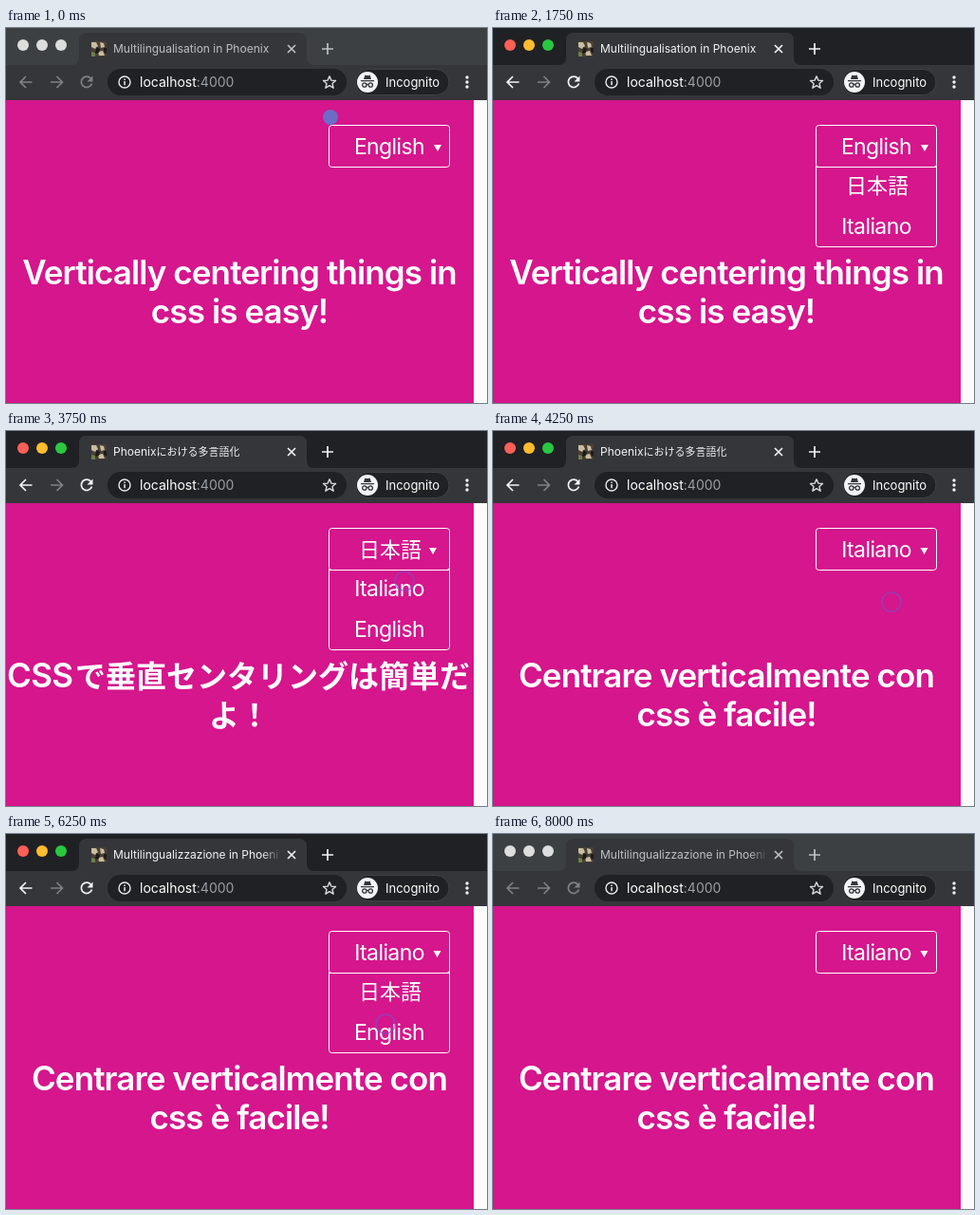
An HTML page that plays this animation: 507 px wide and 395 px high, repeating every 8500 ms.

```html
<!DOCTYPE html>
<html lang="en">
<head>
<meta charset="utf-8">
<title>Language switcher</title>
<style>
html, body { margin: 0; width: 100%; height: 100%; overflow: hidden; background: #d5168c; }
svg { display: block; width: 507px; height: 395px; font-family: Inter, "Noto Sans CJK JP", "Noto Sans CJK", sans-serif; }

/* Everything moves in hard steps on one 8.5 s clock */
svg, .en, .ja, .it, .tab-en, .tab-ja, .tab-it, .menu, .cursor, .ring, .dot {
  animation: 8.5s step-end infinite;
}
svg { animation-name: focus; }
.en { animation-name: en; }
.ja { animation-name: ja; }
.it { animation-name: it; }
.tab-en { animation-name: tab-en; }
.tab-ja { animation-name: tab-ja; }
.tab-it { animation-name: tab-it; }
.menu { animation-name: menu; }
.cursor { animation-name: move; }
.ring { animation-name: ring; }
.dot { animation-name: dot; }

.strip { fill: var(--strip); }
.tab-title { fill: var(--title); font-size: 12px; }
.kana { font-size: 11px; }
.red { fill: var(--red); }
.yellow { fill: var(--yellow); }
.green { fill: var(--green); }
.line { fill: none; stroke-width: 1.7; }
.mark { stroke: var(--title); }
.nav { stroke: var(--nav); }
.nav-fill { fill: var(--nav); }

.head { fill: #fff; font-weight: 600; font-size: 35px; letter-spacing: -.9px; text-anchor: middle; }
.head-ja { fill: #fff; font-weight: 700; font-size: 32px; }
.head-ja .latin { font-weight: 600; font-size: 35px; letter-spacing: -.6px; }
.item { fill: #fff; font-size: 23px; letter-spacing: -.6px; text-anchor: middle; }
.item-ja { fill: #fff; font-size: 22px; text-anchor: middle; }
.box { fill: none; stroke: #fff; }

@keyframes focus {
  0%, 94.11% { --strip: #3c4043; --title: #bdc1c6; --nav: #7f8285; --red: #dcdddd; --yellow: #dcdddd; --green: #dcdddd; }
  2.94% { --strip: #202124; --title: #f1f3f4; --nav: #f1f3f4; --red: #ff5f57; --yellow: #febc2e; --green: #28c840; }
  88.23% { --strip: #2e3134; --title: #d7dadd; --nav: #b8babd; --red: #ee9e9a; --yellow: #edcd86; --green: #82d38f; }
}
@keyframes en { 0% { opacity: 1 } 26.47%, 100% { opacity: 0 } }
@keyframes ja { 0%, 49.99% { opacity: 0 } 26.47% { opacity: 1 } }
@keyframes it { 0% { opacity: 0 } 49.99%, 100% { opacity: 1 } }
@keyframes tab-en { 0% { opacity: 1 } 29.41%, 100% { opacity: 0 } }
@keyframes tab-ja { 0%, 52.93% { opacity: 0 } 29.41% { opacity: 1 } }
@keyframes tab-it { 0% { opacity: 0 } 52.93%, 100% { opacity: 1 } }
@keyframes menu {
  0%, 26.47%, 49.99%, 64.7%, 85.29% { opacity: 0 }
  17.64%, 41.17%, 55.88%, 70.58% { opacity: 1 }
}
@keyframes ring {
  0%, 20.58%, 47.05%, 85.29% { opacity: 0 }
  2.94%, 26.47%, 49.99% { opacity: .6 }
}
@keyframes dot {
  0%, 23.52%, 47.05%, 85.29% { opacity: 1 }
  2.94%, 26.47%, 49.99%, 88.23% { opacity: 0 }
}
@keyframes move {
  0% { transform: translate(342px, 94px) }
  2.94% { transform: translate(354px, 110px) }
  5.88% { transform: translate(382px, 136px) }
  8.82% { transform: translate(408px, 167px) }
  11.76% { transform: translate(414px, 150px) }
  14.7% { transform: translate(414px, 130px) }
  23.52% { transform: translate(414px, 168px) }
  26.47% { transform: translate(416px, 182px) }
  29.41% { transform: translate(418px, 197px) }
  32.35% { transform: translate(421px, 165px) }
  35.29% { transform: translate(421px, 141px) }
  44.11% { transform: translate(420px, 158px) }
  47.05% { transform: translate(420px, 169px) }
  49.99% { transform: translate(420px, 180px) }
  52.93% { transform: translate(420px, 150px) }
  55.88% { transform: translate(418px, 136px) }
  58.82% { transform: translate(414px, 158px) }
  61.76% { transform: translate(411px, 147px) }
  64.7% { transform: translate(412px, 153px) }
  67.64% { transform: translate(413px, 142px) }
  70.58% { transform: translate(412px, 140px) }
  73.52% { transform: translate(400px, 200px) }
  76.46% { transform: translate(380px, 255px) }
  79.41% { transform: translate(355px, 300px) }
  82.35%, 100% { transform: translate(341px, 323px) }
}
</style>
</head>
<body>
<svg viewBox="0 0 507 395">
  <defs>
    <linearGradient id="fade">
      <stop offset="0" stop-color="#35363a" stop-opacity="0"/>
      <stop offset="1" stop-color="#35363a"/>
    </linearGradient>
    <path id="arrow" d="M-4-3.500h8L0 3.500z" fill="#fff"/>
  </defs>

  <!-- Tab strip -->
  <rect class="strip" width="507" height="40"/>
  <circle class="red" cx="18" cy="18" r="6"/>
  <circle class="yellow" cx="38" cy="18" r="6"/>
  <circle class="green" cx="58" cy="18" r="6"/>
  <path fill="#35363a" d="M69 39q8 0 8-8V13q0-8 8-8h224q8 0 8 8v18q0 8 8 8v1H69z"/>
  <g>
    <rect x="90" y="14" width="16" height="16" fill="#4a4034"/>
    <path fill="#c9bda2" d="M90 15h5l2 4-3 3-4-2zM99 15l4 1 1 4-4 1zM97 25l5-1 2 5h-6z"/>
    <path fill="#1e1c19" d="M95 20l4 2-1 4-4 1zM103 21h3v6l-3-2z"/>
    <path fill="#6f7f4e" d="M90 25l4 1v4h-4z"/>
  </g>
  <g class="tab-title">
    <text class="tab-en" x="113" y="26">Multilingualisation in Phoenix</text>
    <text class="tab-ja" x="113" y="26" lang="ja">Phoenix<tspan class="kana">における多言語化</tspan></text>
    <g class="tab-it">
      <text x="113" y="26">Multilingualizzazione in Phoenix</text>
      <rect x="270" y="12" width="20" height="20" fill="url(#fade)"/>
      <rect x="289.500" y="12" width="6" height="20" fill="#35363a"/>
    </g>
  </g>
  <path class="line mark" d="M297 18l8 8m0-8l-8 8M333 22h12M339 16v12"/>

  <!-- Toolbar -->
  <rect y="39" width="507" height="37" fill="#35363a"/>
  <path class="line nav" d="M27.500 57H15.500M21 51l-6 6 6 6"/>
  <path class="line" stroke="#7f8285" d="M47 57h12M53.500 51l6 6-6 6"/>
  <path class="line nav" d="M89.500 53.200A5.700 5.700 0 1 0 90.500 58.500"/>
  <path class="nav-fill" d="M91.500 50.500v6h-6z"/>
  <rect x="107" y="43" width="252" height="28" rx="14" fill="#202124"/>
  <circle class="line" cx="125" cy="57" r="6" stroke="#e8eaed" style="stroke-width:1.4"/>
  <path fill="#e8eaed" d="M124.300 56h1.500v4.200h-1.500zM124.300 53.400h1.500v1.500h-1.500z"/>
  <text x="141" y="62" font-size="14" fill="#fff">localhost<tspan fill="#9aa0a6">:4000</tspan></text>
  <path fill="none" stroke="#dadce0" stroke-width="1.400" stroke-linejoin="round"
    d="M341 50.800l1.900 4.300 4.600.4-3.500 3.100 1.100 4.600-4.100-2.500-4.100 2.500 1.100-4.600-3.500-3.100 4.600-.4z"/>
  <rect x="368.500" y="43.500" width="98.500" height="27" rx="13.500" fill="#202124" stroke="#3f4145"/>
  <circle cx="381" cy="57" r="11" fill="#f1f3f4"/>
  <path fill="#35363a" d="M377 54l1.400-4.500q2.600 1 5.200 0L385 54zM374 55h14v1.300h-14z"/>
  <path fill="none" stroke="#35363a" stroke-width="1.300"
    d="M375.600 60a2.200 2.200 0 1 0 4.400 0 2.200 2.200 0 1 0-4.400 0M382 60a2.200 2.200 0 1 0 4.400 0 2.200 2.200 0 1 0-4.400 0M380 59.600q1-.6 2 0"/>
  <text x="400" y="62" font-size="13" fill="#fff">Incognito</text>
  <g fill="#f1f3f4">
    <circle cx="486" cy="52" r="1.700"/>
    <circle cx="486" cy="57" r="1.700"/>
    <circle cx="486" cy="62" r="1.700"/>
  </g>

  <!-- Page -->
  <rect y="76" width="493" height="319" fill="#d5168c"/>
  <rect x="493" y="76" width="14" height="319" fill="#fbfbfb"/>
  <rect class="box" x="340.500" y="102.500" width="127" height="44" rx="3"/>
  <path class="menu box" d="M340.500 145v82.500q0 3 3 3h121q3 0 3-3V145M340.500 146.500h127"/>

  <g class="en">
    <text class="item" x="404" y="133">English</text>
    <use href="#arrow" x="455" y="126.500"/>
    <g class="menu">
      <text class="item-ja" x="405" y="174" lang="ja">日本語</text>
      <text class="item" x="404" y="217">Italiano</text>
    </g>
    <text class="head" x="246" y="270">Vertically centering things in</text>
    <text class="head" x="246" y="311">css is easy!</text>
  </g>
  <g class="ja" lang="ja">
    <text class="item-ja" x="405" y="133">日本語</text>
    <use href="#arrow" x="450" y="126.500"/>
    <g class="menu">
      <text class="item" x="404" y="174">Italiano</text>
      <text class="item" x="404" y="217">English</text>
    </g>
    <text class="head-ja" x="1" y="270"><tspan class="latin">CSS</tspan><tspan x="73">で垂直センタリングは簡単だ</tspan></text>
    <text class="head-ja" x="214" y="311">よ！</text>
  </g>
  <g class="it">
    <text class="item" x="404" y="133">Italiano</text>
    <use href="#arrow" x="454.500" y="126.500"/>
    <g class="menu">
      <text class="item-ja" x="405" y="174" lang="ja">日本語</text>
      <text class="item" x="404" y="217">English</text>
    </g>
    <text class="head" x="246" y="270">Centrare verticalmente con</text>
    <text class="head" x="246" y="311">css è facile!</text>
  </g>

  <g class="cursor">
    <circle class="ring" r="10" fill="none" stroke="#7a4fc8" stroke-width="1.700"/>
    <circle class="dot" r="8" fill="#6c6cc8"/>
  </g>
</svg>
</body>
</html>
```
